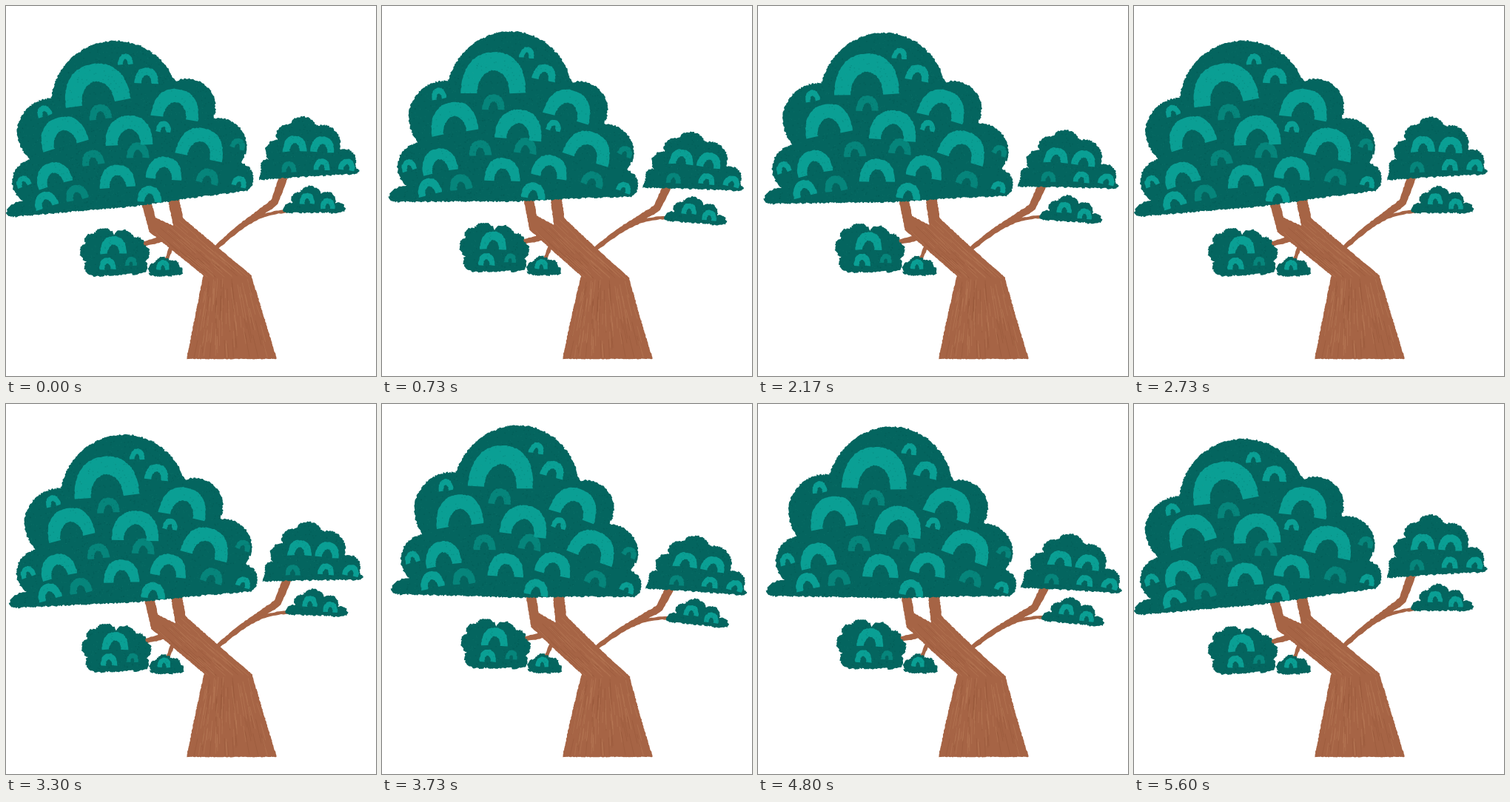
Write an HTML page with a canvas that moves like this. It is 500x500 px and loops after 5.66 s.

```html
<!DOCTYPE html>
<html lang="en">
<head>
<meta charset="utf-8">
<title>Swaying tree</title>
<style>
  html, body { margin: 0; width: 100%; height: 100%; overflow: hidden; background: #fff; }
  canvas { display: block; width: 500px; height: 500px; }
</style>
</head>
<body>
<canvas id="stage" width="500" height="500"></canvas>
<script>
const LOOP = 5660, POSES = 141, SWAYS = 2;
const LEAF = '#04655f', BRIGHT = '#0a9f94', MUTED = '#06857b';
const BARK = '#a66445', BARK_LIGHT = '#b97b59', BARK_DARK = '#98593a';

const ctx = document.getElementById('stage').getContext('2d');

let seed = 20;
const rand = () => {
  seed = (seed * 1664525 + 1013904223) >>> 0;
  return seed / 4294967296;
};
const between = (a, b) => a + (b - a) * rand();
const mix = (a, b, k) => a + (b - a) * k;

// Full-sway displacement [dx, dy] of a point, one rule per part of the tree.
const bendWood = (x, y) => {
  const h = 476 - y;
  return [0.00036 * h * h, 0.0006 * (x - 246) * h];
};
const bendCrown = (x, y) => {
  const u = x - 180, v = 262 - y;
  return [19 + 0.12 * v + 0.0006 * v * v - 0.0003 * u * v, -11 + 0.17 * u + 0.0007 * u * v];
};
const tilt = (cx, cy, dx, dy, turn, sink = 0) => (x, y) =>
  [dx + turn * (cy - y), dy + turn * (x - cx) + sink * (cy - y)];

// Sample an SVG path into evenly spaced points.
const tracer = document.createElementNS('http://www.w3.org/2000/svg', 'path');
function trace(d, step = 1.6) {
  tracer.setAttribute('d', d);
  const len = tracer.getTotalLength(), n = Math.ceil(len / step);
  return Array.from({ length: n + 1 }, (_, i) => {
    const p = tracer.getPointAtLength(i * len / n);
    return [p.x, p.y];
  });
}

const roughen = (pts, amount) =>
  pts.map(([x, y]) => [x + between(-amount, amount), y + between(-amount, amount)]);

// Leafy edge: a round lobe between each pair of cusps, closed by a base curve.
function scallop(cusps, base) {
  let d = 'M' + cusps[0];
  for (let i = 1; i < cusps.length; i++) {
    const [x, y] = cusps[i], [px, py] = cusps[i - 1];
    const chord = Math.hypot(x - px, y - py);
    const r = chord / 2 + Math.min(2.5, chord / 20);
    d += ` A${r} ${r} 0 0 1 ${x} ${y}`;
  }
  return `${d} ${base}Z`;
}

// Brush stroke shaped like an arch; its size sets height and thickness.
function arch(cx, cy, w, angle) {
  const h = 1.15 * w + 3, t = 2 + 0.45 * w, n = Math.round(w * 1.5) + 8;
  const c = Math.cos(angle), s = Math.sin(angle), pts = [];
  const add = (a, rx, ry, power) => {
    const x = Math.sign(Math.cos(a)) * Math.abs(Math.cos(a)) ** power * rx;
    const y = h / 2 - Math.abs(Math.sin(a)) ** power * ry;
    pts.push([cx + x * c - y * s, cy + x * s + y * c]);
  };
  for (let i = 0; i <= n; i++) add(Math.PI * (1 - i / n), w, h, 0.86);
  for (let i = 0; i <= n; i++) add(Math.PI * i / n, w - t, h - t * 1.1, 1);
  return roughen(pts, 0.6);
}

// Arches grouped by half-width; they lean outward from the middle of the clump.
const arches = (groups, middle) => Object.entries(groups).flatMap(([w, spots]) =>
  spots.map(([x, y]) => arch(x, y, +w, (x - middle) * 0.0024)));

function speckle(pts, spacing) {
  const xs = pts.map(p => p[0]), ys = pts.map(p => p[1]);
  const x0 = Math.min(...xs), x1 = Math.max(...xs), y0 = Math.min(...ys), y1 = Math.max(...ys);
  return Array.from({ length: (x1 - x0) * (y1 - y0) / spacing },
    () => [between(x0, x1), between(y0, y1)]);
}

function foliage({ bend, cusps, base, bright, muted = {} }) {
  const edge = roughen(trace(scallop(cusps, base)), 1.1);
  const middle = cusps.reduce((sum, p) => sum + p[0], 0) / cusps.length;
  return {
    edge, bend, grain: speckle(edge, 32),
    bright: arches(bright, middle), muted: arches(muted, middle)
  };
}

const rightClump = foliage({
  bend: tilt(382, 217, 22, 28, 0.17, 0.11),
  cusps: [[345, 221], [354, 207], [367, 181], [383, 160], [419, 162], [450, 194], [472, 217]],
  base: 'L478 222 L475 227 Q409 230 341 235',
  bright: { 16: [[390, 186], [428, 187]], 11: [[427, 214], [461, 214]] },
  muted: { 10: [[382, 217]] }
});

const lowRightClump = foliage({
  bend: tilt(410, 275, 13, 25, 0.15, 0.06),
  cusps: [[375, 278], [387, 267], [397, 252], [426, 253], [446, 267], [458, 277]],
  base: 'Q450 281 430 279 L378 280',
  bright: { 10: [[407, 260], [435, 267]] }
});

const lowLeftClump = foliage({
  bend: tilt(136, 345, 8, -11, 0.085, -0.05),
  cusps: [[108, 345], [107, 321], [119, 308], [146, 309], [173, 313], [186, 323], [188, 345], [184, 361]],
  base: 'Q172 365 165 361 Q150 366 135 364 Q120 368 109 361 Q103 352 108 345',
  bright: { 18: [[145, 323]], 11: [[137, 348]] },
  muted: { 8: [[169, 345]] }
});

const smallClump = foliage({
  bend: tilt(215, 360, 5.5, -2, 0.08),
  cusps: [[194, 360], [201, 347], [222, 345], [234, 352], [237, 363]],
  base: 'Q215 367 193 364',
  bright: { 9: [[212, 350]] }
});

const crown = foliage({
  bend: bendCrown,
  cusps: [[22, 263], [33, 207], [61, 125], [228, 102], [280, 152], [317, 212], [326, 250]],
  base: 'Q270 256 180 270 Q100 277 20 284 Q2 287 0 280 Q3 267 22 263',
  bright: {
    44: [[121, 105]],
    32: [[230, 132], [76, 170], [166, 168], [264, 185]],
    24: [[63, 227], [150, 230], [214, 219]],
    16: [[190, 94], [53, 262], [194, 254]],
    10: [[161, 72], [51, 142], [213, 163], [23, 237], [316, 237]]
  },
  muted: { 15: [[127, 143], [178, 195], [117, 205], [95, 252], [273, 230]], 10: [[314, 186]] }
});

const foliageParts = [rightClump, lowRightClump, lowLeftClump, smallClump, crown];

// Tapered branch around a centre line.
function limb(d, from, to) {
  const mid = trace(d, 3), left = [], right = [], last = mid.length - 1;
  mid.forEach(([x, y], i) => {
    const [ax, ay] = mid[Math.max(0, i - 1)], [bx, by] = mid[Math.min(last, i + 1)];
    const k = mix(from, to, i / last) / 2 / Math.hypot(bx - ax, by - ay);
    left.push([x + (by - ay) * k, y - (bx - ax) * k]);
    right.unshift([x - (by - ay) * k, y + (bx - ax) * k]);
  });
  return left.concat(right);
}

const wood = [
  limb('M280 331 Q304 307 329 290 L363 265 L375 231', 6, 12),
  limb('M328 293 Q350 279 380 277.5', 5, 4),
  limb('M178 324 L214 314', 6, 8),
  limb('M217 343 L225 322', 5, 6),
  trace(`M244 477 L266.5 364 L193.5 305 L182 262 L195 260 L202 286 L226 297 L218 258 L233 256
    L239.5 287 L331.5 364 L366 477Z`)
].map(pts => roughen(pts, 0.45));

// Bark streaks: s runs across the trunk, q along it.
const lower = (s, q) => [mix(268 + 62 * s, 245 + 121 * s, q), mix(367, 476, q)];
const upper = (s, q) => [mix(195 + 43 * s, 268 + 62 * s, q), mix(304 - 16 * s, 367, q)];
function streaks(place, count) {
  return Array.from({ length: count }, () => {
    const s = between(0.04, 0.96), q = between(0, 0.85), end = Math.min(0.99, q + between(0.08, 0.35));
    return [place(s, q), place(s + between(-0.01, 0.01), end)];
  });
}
const light = [...streaks(lower, 60), ...streaks(upper, 40)];
const dark = [...streaks(lower, 40), ...streaks(upper, 28)];

const mover = (bend, sway) => ([x, y]) => {
  const [dx, dy] = bend(x, y);
  return [x + dx * sway, y + dy * sway];
};

function outline(pts, move) {
  const path = new Path2D();
  for (const p of pts) path.lineTo(...move(p));
  path.closePath();
  return path;
}

function fill(shapes, color, move) {
  ctx.fillStyle = color;
  for (const s of shapes) ctx.fill(outline(s, move));
}

function drawFoliage(part, sway) {
  const move = mover(part.bend, sway);
  const edge = outline(part.edge, move);
  ctx.fillStyle = LEAF;
  ctx.fill(edge);
  ctx.save();
  ctx.clip(edge);
  fill(part.muted, MUTED, move);
  fill(part.bright, BRIGHT, move);
  part.grain.forEach((p, i) => {
    const [x, y] = move(p);
    ctx.fillStyle = i % 2 ? 'rgba(0,50,50,.13)' : 'rgba(60,170,150,.1)';
    ctx.fillRect(x, y, 1.3, 1.3);
  });
  ctx.restore();
}

function drawStreaks(lines, color, move) {
  ctx.beginPath();
  for (const [a, b] of lines) {
    ctx.moveTo(...move(a));
    ctx.lineTo(...move(b));
  }
  ctx.strokeStyle = color;
  ctx.stroke();
}

function drawWood(sway) {
  const move = mover(bendWood, sway);
  fill(wood, BARK, move);
  ctx.lineWidth = 0.9;
  ctx.globalAlpha = 0.6;
  drawStreaks(dark, BARK_DARK, move);
  drawStreaks(light, BARK_LIGHT, move);
  ctx.globalAlpha = 1;
}

// 25 poses a second shown on a 30 Hz clock: every sixth tick repeats a pose.
function poseAt(t) {
  const tick = Math.floor((t + 3.4) * 0.03);
  return 5 * Math.floor(tick / 6) + Math.max(0, tick % 6 - 1);
}

let shown = -1;
function render(t) {
  const pose = poseAt(t);
  if (pose === shown) return;
  shown = pose;
  const sway = 0.524 * (1 - Math.cos(2 * Math.PI * SWAYS * pose / POSES));
  ctx.clearRect(0, 0, 500, 500);
  drawWood(sway);
  for (const part of foliageParts) drawFoliage(part, sway);
}

const start = performance.now();
function tick() {
  render((performance.now() - start) % LOOP);
  requestAnimationFrame(tick);
}
tick();
</script>
</body>
</html>
```
